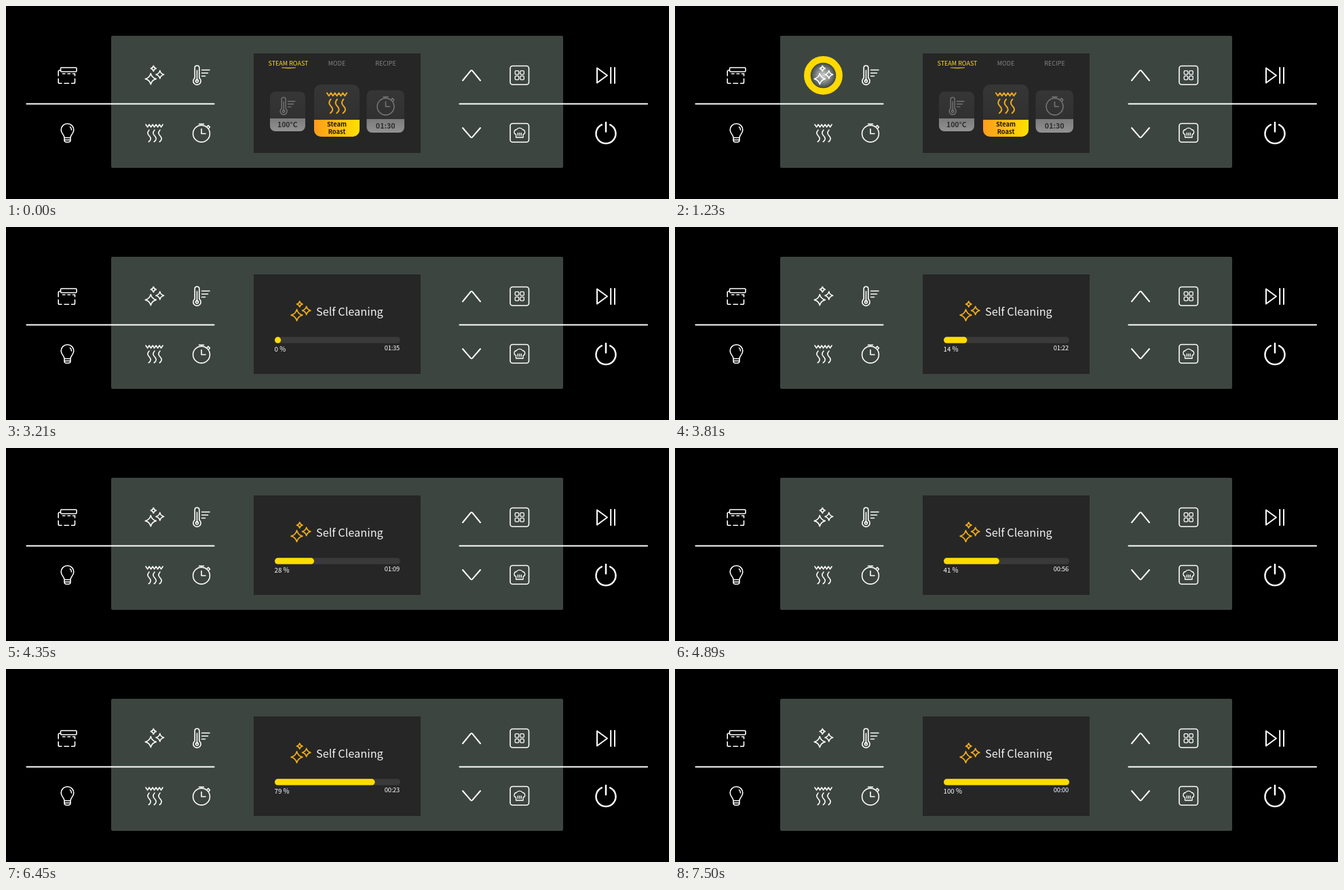
These frames come from a looping animation (977 by 285 pixels, 8 s). An HTML page:

```html
<!DOCTYPE html>
<html lang="en">
<head>
<meta charset="utf-8">
<title>Oven control panel</title>
<style>
html, body { margin: 0; width: 100%; height: 100%; overflow: hidden; background: #000; }
svg { display: block; width: 977px; height: 285px; }
text { font-family: "Noto Sans CJK SC", "Noto Sans CJK JP", "Noto Sans", sans-serif; }
.icon { fill: none; stroke: #fff; stroke-width: 1.6; stroke-linecap: round; stroke-linejoin: round; }
.mid { text-anchor: middle; }
.tab { font-size: 9px; fill: #858585; }
.card { font-weight: 700; fill: #2b2b2b; }
</style>
</head>
<body>
<svg viewBox="0 0 977 285">
  <defs>
    <linearGradient id="warm"><stop offset="0" stop-color="#ff9d1c"/><stop offset="1" stop-color="#ffe000"/></linearGradient>
    <linearGradient id="gold" x1="0" y1="0" x2="0" y2="1"><stop offset="0" stop-color="#f5b81a"/><stop offset="1" stop-color="#ee9c1a"/></linearGradient>
    <linearGradient id="dark" x1="0" y1="0" x2="0" y2="1"><stop offset="0" stop-color="#363636"/><stop offset="1" stop-color="#2e2e2e"/></linearGradient>
    <linearGradient id="gray" x1="0" y1="0" x2="0" y2="1"><stop offset="0" stop-color="#7b7b7b"/><stop offset="1" stop-color="#929292"/></linearGradient>
    <linearGradient id="fill" gradientUnits="userSpace" x1="396" x2="581" y1="0" y2="0">
      <stop offset="0" stop-color="#ffdc00"/><stop offset=".5" stop-color="#ffd800"/><stop offset="1" stop-color="#ffa50c"/>
    </linearGradient>
    <radialGradient id="halo">
      <stop offset="0" stop-color="#fff" stop-opacity=".75"/><stop offset=".5" stop-color="#fff" stop-opacity=".4"/><stop offset="1" stop-color="#fff" stop-opacity="0"/>
    </radialGradient>
    <g id="stars"></g>
    <g id="thermo">
      <path d="M278.2 106.3V91.3a3.3 3.3 0 0 1 6.6 0V106.3a5.6 5.6 0 1 1-6.6 0ZM281.5 95V110M288.5 94.5H300M288.5 99H297.5M288.5 103.5H293.5"/>
      <circle cx="281.5" cy="110.8" r="2"/>
    </g>
    <g id="steam"></g>
    <g id="timer">
      <circle cx="288" cy="188.5" r="12.4"/>
      <path d="M284.5 174.2H291.5M288 181.5V188.5H294M296.2 178.2l1.8-1.8 2.4 2.4-1.5 1.8"/>
    </g>
  </defs>

  <rect width="977" height="285"/>
  <rect x="155" y="44" width="666" height="195" rx="2" fill="#3d4541"/>
  <rect x="365" y="70" width="246" height="147" fill="#262626"/>
  <path d="M30.5 144.5H306.5M668.5 144.5H945" stroke="#fff" stroke-width="2.2" stroke-linecap="round"/>

  <circle id="glow" cx="218.5" cy="102.5" fill="url(#halo)"/>
  <circle id="ring" cx="218.5" cy="102.5" fill="none" stroke="#ffd900"/>

  <g class="icon">
    <!-- water tank -->
    <rect x="80.5" y="91" width="23.5" height="6" rx="1.2"/>
    <path d="M80.5 95H79q-1.8 0-1.8 1.8V103M83.5 100H87M91 100H94.5M98.5 100H101.5V103M77.2 107.5V112.5q0 1.8 1.8 1.8H82M86 114.3H92.5M96.5 114.3H99.7q1.8 0 1.8-1.8V107.5"/>
    <!-- lamp -->
    <path d="M86 194.5C86 190 81.2 188.500 81.200 183a9.300 9.300 0 0 1 18.600 0C99.800 188.500 95 190 95 194.500ZM86 194.500V198q0 3 3 3h3q3 0 3-3V194.500M86.500 197.700H94.500M94.500 178.500q2 1.600 2 4.500"/>
    <use href="#stars"/>
    <use href="#thermo"/>
    <use href="#steam"/>
    <use href="#timer"/>
    <path d="M673 110L684.800 95.600q1.200-1.200 2.400 0L699 110M673 180L684.800 193.600q1.200 1.200 2.400 0L699 180" stroke-width="2"/>
    <rect x="743" y="88.500" width="27.500" height="27.500" rx="3.500"/>
    <rect x="743" y="173.500" width="27.500" height="27.500" rx="3.500"/>
    <g stroke-width="1.300">
      <rect x="750.200" y="95.700" width="5.500" height="5.500" rx="1.400"/>
      <rect x="757.800" y="95.700" width="5.500" height="5.500" rx="1.400"/>
      <rect x="750.200" y="103.300" width="5.500" height="5.500" rx="1.400"/>
      <rect x="757.800" y="103.300" width="5.500" height="5.500" rx="1.400"/>
      <path d="M751.500 194V189.700a3.700 3.700 0 0 1 .8-7.200q1.500-2.300 4.500-2.300t4.500 2.300a3.700 3.700 0 0 1 .8 7.200V194ZM754.300 191V187.500M756.800 191V187.500M759.300 191V187.500"/>
    </g>
    <path d="M871 91.500V113.500L886 102.500ZM891.200 91V114M897 91V114" stroke-width="2"/>
    <path d="M890.200 175.300a14.500 14.500 0 1 1-12.400 0M884 172V185.500" stroke-width="2.500"/>
  </g>

  <g id="home">
    <text class="tab mid" x="416" y="88" style="fill:#ffe01e;font-weight:500">STEAM ROAST</text>
    <text class="tab mid" x="487.500" y="88">MODE</text>
    <text class="tab mid" x="559.500" y="88">RECIPE</text>
    <path d="M406 91Q416.500 93 427 91Q416.500 91.300 406 91Z" fill="#ffe01e" stroke="#ffe01e" stroke-width=".4"/>

    <rect x="389" y="126.500" width="52" height="58.500" rx="8" fill="url(#dark)"/>
    <path d="M389 166H441V177a8 8 0 0 1-8 8H397a8 8 0 0 1-8-8Z" fill="url(#gray)"/>
    <rect x="531.500" y="124.500" width="55.500" height="62.500" rx="8" fill="url(#dark)"/>
    <path d="M531.500 167H587V179a8 8 0 0 1-8 8H539.500a8 8 0 0 1-8-8Z" fill="url(#gray)"/>
    <rect x="454" y="116" width="67" height="77" rx="10" fill="url(#dark)"/>
    <path d="M454 168H521V183a10 10 0 0 1-10 10H464a10 10 0 0 1-10-10Z" fill="url(#warm)"/>

    <use class="icon" href="#thermo" transform="translate(415 147.500) scale(.9) translate(-288 -102)" style="stroke:#747474"/>
    <use class="icon" href="#timer" transform="translate(559.500 147.500) translate(-288 -187.500)" style="stroke:#747474"/>
    <use class="icon" href="#steam" transform="translate(487.500 143) scale(1.170) translate(-218.500 -187.500)" style="stroke:#f2ac1a"/>

    <text class="card mid" x="414.800" y="179" font-size="10.500">100°C</text>
    <text class="card mid" x="559.200" y="180.500" font-size="10.700">01:30</text>
    <text class="card mid" x="487.500" y="178" font-size="9.300" style="fill:#1c1600">Steam</text>
    <text class="card mid" x="487.500" y="188.700" font-size="9.300" style="fill:#1c1600">Roast</text>
  </g>

  <g id="clean">
    <use class="icon" href="#stars" transform="translate(434.300 124.200) scale(1.050) translate(-218.800 -102)" style="stroke:#f0ab1a"/>
    <text x="457" y="130.500" font-size="16.300" font-weight="500" fill="#f2f2f2">Self Cleaning</text>
    <rect x="396" y="162.300" width="185" height="9.200" rx="4.600" fill="#3a3a3a"/>
    <rect id="bar" x="396" y="162.300" height="9.200" rx="4.600" fill="url(#fill)"/>
    <text id="pct" x="395.500" y="184" font-size="9.800" fill="#fff"></text>
    <text id="left" x="580" y="182.300" font-size="9.300" letter-spacing="-.2" text-anchor="end" fill="#fff"></text>
  </g>
</svg>
<script>
const $ = id => document.getElementById(id);
const LOOP = 8000, STEP = 30;
const PULSE = [1020, 1740], SWITCH = 2430, RUN = [3210, 7500];
// progress share, seconds left
const CLOCK = [[0, 95], [.14, 82], [.3916, 56], [.7552, 23], [1, 0]];

const star = (x, y, r) => {
  const k = r * .2;
  return `<path d="M${x} ${y - r}Q${x + k} ${y - k} ${x + r} ${y}Q${x + k} ${y + k} ${x} ${y + r}` +
    `Q${x - k} ${y + k} ${x - r} ${y}Q${x - k} ${y - k} ${x} ${y - r}Z"/>`;
};
$('stars').innerHTML = star(213.3, 107.6, 8) + star(226.8, 101.2, 5.8) + star(217.3, 92.2, 4);

const wisp = x => `M${x} 183c-4 4.500-1.500 7 .5 9.200s3 5 -1.200 8.300`;
$('steam').innerHTML = `<path d="M206 175${'q2.200 6.600 4.300 2.200t4.200-2.200'.slice(0, 0)}` +
  `l2.600 3.800 2.500-3.800 2.500 3.800 2.500-3.800 2.500 3.800 2.500-3.800 2.500 3.800 2.500-3.800 2.500 3.800 2.500-3.800` +
  [211, 219, 227].map(wisp).join('') + '"/>';

const clamp = v => Math.min(1, Math.max(0, v));

function secondsLeft(u) {
  const i = Math.max(1, CLOCK.findIndex(p => u <= p[0]));
  const [a, s] = CLOCK[i - 1], [b, e] = CLOCK[i];
  return Math.round(s + (e - s) * (u - a) / (b - a));
}

function pulse(t) {
  const on = t >= PULSE[0] && t < PULSE[1];
  const q = on ? (t - PULSE[0] + STEP) / (PULSE[1] - PULSE[0] + STEP) : 0;
  const outer = 41.5 * (1 - (1 - q) ** 3), inner = outer * (.5 + q / 2);
  const fade = on ? clamp((1 - q) / .5) : 0;
  $('ring').setAttribute('r', (outer + inner) / 2);
  $('ring').setAttribute('stroke-width', outer - inner);
  $('ring').setAttribute('opacity', fade);
  $('glow').setAttribute('r', Math.min(inner, 20));
  $('glow').setAttribute('opacity', fade);
}

function draw(ms) {
  const t = Math.floor(ms % LOOP / STEP) * STEP;
  pulse(t);
  const cleaning = t >= SWITCH;
  $('home').style.display = cleaning ? 'none' : '';
  $('clean').style.display = cleaning ? '' : 'none';
  const u = clamp((t - RUN[0]) / (RUN[1] - RUN[0]));
  const p = u + .23 * u * u * (1 - u);
  const s = secondsLeft(u), two = n => String(n).padStart(2, '0');
  $('bar').setAttribute('width', 9.2 + 175.8 * p);
  $('pct').textContent = Math.round(p * 100) + ' %';
  $('left').textContent = two(Math.floor(s / 60)) + ':' + two(s % 60);
}

const start = performance.now();
function tick() {
  draw(performance.now() - start);
  requestAnimationFrame(tick);
}
tick();
</script>
</body>
</html>
```
